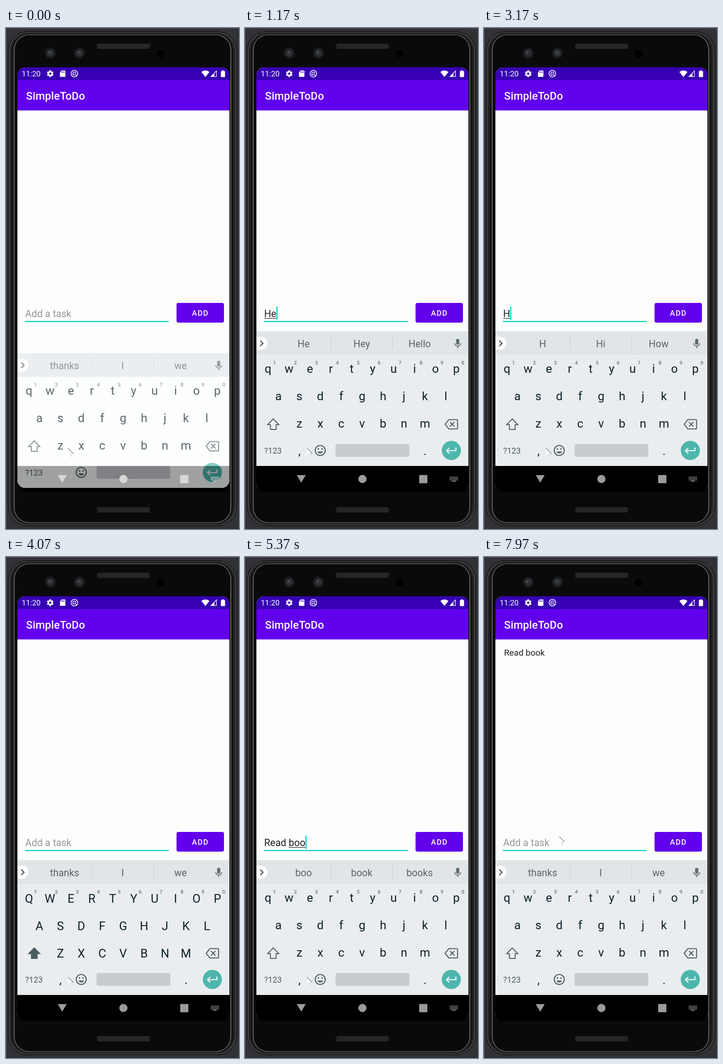
Write an HTML page with a canvas that moves like this. It is 511x1097 px and loops after 8000 ms.

```html
<!DOCTYPE html>
<html lang="en">
<head>
<meta charset="utf-8">
<title>To-do app on a phone</title>
<style>
  html, body { margin: 0; width: 100%; height: 100%; overflow: hidden; background: #303236; }
  canvas { display: block; }
</style>
</head>
<body>
<canvas id="stage" width="511" height="1097"></canvas>
<script>
const ctx = document.getElementById('stage').getContext('2d');
const LOOP = 8000;
const FONT = 'Roboto, sans-serif';
const TEAL = '#03dac5', PURPLE = '#6200ee', PAPER = '#fcfdfd';
const IDLE = 'thanks I we';

// time, typed text, suggestions, caret visible, capital keys
const TYPING = [
  [0, '', IDLE, 0], [290, '', IDLE, 1],
  [720, 'H', IDLE, 1], [870, 'H', 'H Hi How', 1],
  [1170, 'He', 'He Hey Hello', 1], [1290, 'Hel', 'He Hey Hello', 1],
  [1430, 'Hel', 'Hel Help Hello', 1], [1570, 'Hell', "Hell He'll Hello", 1],
  [2000, 'Hello', "Hello Hellos Hello's", 1], [2430, 'Hello', "Hello Hellos Hello's", 0],
  [2580, 'Hell', "Hell He'll Hello", 1], [2730, 'Hel', 'Hel Help Hello', 1],
  [3020, 'He', 'He Hey Hello', 1], [3170, 'H', 'H Hi How', 1],
  [3320, '', IDLE, 1], [3780, '', IDLE, 0], [4070, '', IDLE, 0, 1],
  [4220, 'R', 'R Re Right', 1], [4360, 'Re', 'Re Red Really', 1],
  [4500, 'Rea', 'Rea Read Really', 1], [4650, 'Read', 'Read Reading Ready', 1],
  [4790, 'Read ', 'the it about', 1], [5080, 'Read b', 'b be but', 1],
  [5220, 'Read bo', 'bo both book', 1], [5370, 'Read boo', 'boo book books', 1],
  [5650, 'Read book', 'book books booked', 1], [6110, 'Read book', 'book books booked', 0],
  [6690, 'Read book', 'book books booked', 1],
  [7390, '', IDLE, 1], [7830, '', IDLE, 0]
];
// time, tip x, tip y
const POINTER = [
  [0, 136, 920], [6250, 225, 790], [6400, 372, 584], [6540, 392, 565], [6690, 431, 506],
  [6830, 418, 612], [7540, 408, 612], [7680, 330, 622], [7830, 220, 618], [7970, 165, 612]
];
// time, radius, opacity
const RIPPLE = [[0, 0, 0], [7100, 31, .25], [7250, 88, .25], [7390, 100, .12], [7540, 0, 0]];
const ITEM_ADDED = 7390;

const at = (steps, t) => steps.findLast(s => s[0] <= t);

function box(x, y, w, h, color, r = 0) {
  ctx.fillStyle = color;
  ctx.beginPath();
  ctx.roundRect(x, y, w, h, r);
  ctx.fill();
}
function disc(x, y, r, color) {
  ctx.fillStyle = color;
  ctx.beginPath();
  ctx.arc(x, y, r, 0, 7);
  ctx.fill();
}
function text(str, x, y, size, color, { align = 'left', weight = 400, spacing = 0 } = {}) {
  ctx.font = `${weight} ${size}px ${FONT}`;
  ctx.textAlign = align;
  ctx.letterSpacing = spacing + 'px';
  ctx.fillStyle = color;
  ctx.fillText(str, x, y);
  const width = ctx.measureText(str).width;
  ctx.letterSpacing = '0px';
  return width;
}
function fillPath(d, color) {
  ctx.fillStyle = color;
  ctx.fill(new Path2D(d));
}
function line(d, color, width = 2) {
  ctx.strokeStyle = color;
  ctx.lineWidth = width;
  ctx.stroke(new Path2D(d));
}
function clipBox(x, y, w, h, r) {
  ctx.save();
  ctx.beginPath();
  ctx.roundRect(x, y, w, h, r);
  ctx.clip();
}

function speaker(y) {
  box(199, y, 117, 12, '#1d1d1d', 4);
  for (let row = 0; row < 4; row++)
    for (let x = 202 + row % 2 * 1.5; x < 314; x += 3) box(x, y + 1.5 + row * 2.6, 1.4, 1.4, '#414141');
}

function camera(x) {
  disc(x, 55, 12, '#191a1c');
  disc(x, 55, 8.5, '#27292d');
  disc(x, 55, 5, '#3a3e45');
  disc(x, 55, 2.6, '#17191c');
  disc(x - 1, 54, 1.3, '#8d939b');
}

function phone() {
  box(0, 0, 511, 1097, '#303236');
  box(0, 0, 511, 1, '#54565a');
  box(0, 0, 1, 1097, '#54565a');
  // x inset, y inset, corner radius, colour
  for (const [x, y, r, color] of [
    [4.5, 7.5, 43, '#0b0b0b'], [6, 9, 41, '#484848'], [8, 10.5, 40, '#262626'],
    [12, 12, 38, '#141414'], [17, 14, 34, '#666'], [19, 15.5, 32, '#0a0a0a']
  ]) box(x, y, 511 - 2 * x, 1098 - 2 * y, color, r);
  speaker(34);
  speaker(1049);
  camera(97);
  camera(161);
  disc(339, 56, 9, '#000');
}

function statusBar() {
  box(25, 86, 465, 28, '#3700b3');
  text('11:20', 34.5, 106, 16.6, '#fff');
  // settings gear
  disc(97, 100, 5.6, '#fff');
  for (let i = 0; i < 6; i++) {
    ctx.save();
    ctx.translate(97, 100);
    ctx.rotate(i * Math.PI / 3);
    box(-2, -7.4, 4, 3.5, '#fff', 1);
    ctx.restore();
  }
  disc(97, 100, 2.5, '#3700b3');
  // memory card
  fillPath('M122 93h7q1.3 0 1.3 1.3v11.4q0 1.3-1.3 1.3h-9.4q-1.3 0-1.3-1.3v-8.8z', '#fff');
  for (const x of [121.5, 124.2, 126.9]) box(x, 95, 1.4, 3, '#3700b3');
  // ring with a slash
  line('M157.2 100a7.2 7.2 0 1 1-14.4 0a7.2 7.2 0 1 1 14.4 0M153.5 100a3.5 3.5 0 1 0-3.5 3.5M150 100l5.2 5.2', '#fff', 1.6);
  // wifi, signal, battery
  fillPath('M437.3 107.3L428.4 96.2Q437.3 89.6 446.2 96.2z', '#fff');
  line('M461.5 94v12.3h-12z', '#fff', 1.3);
  fillPath('M449 106.8l8-8v8z', '#fff');
  box(471.2, 94.3, 9.2, 13.2, '#fff', 1.2);
  box(473.8, 92.8, 4, 2, '#fff');
}

function form(typed, caret, ripple) {
  const left = 42, size = 21.5;
  if (typed) {
    const width = text(typed, left, 633, size, '#212121');
    const start = typed.lastIndexOf(' ') + 1;
    const before = ctx.measureText(typed.slice(0, start)).width;
    if (start < typed.length) box(left + before, 635.3, width - before, 1.2, '#212121');
    if (caret) box(left + width, 610, 2.6, 29, TEAL);
  } else {
    text('Add a task', left, 633, size, '#979797');
    if (caret) box(41.3, 610, 2.6, 29, TEAL);
  }
  box(41.5, 641.6, 315.5, 2.4, '#14d3c0');

  box(374, 603, 104, 43, 'rgba(0,0,0,.1)', 5);
  box(374, 602, 104, 43, PURPLE, 4);
  text('ADD', 407.7, 630.3, 16.6, '#fff', { weight: 500, spacing: 1.48 });
  if (ripple[1]) {
    clipBox(374, 602, 104, 43, 4);
    disc(418, 612, ripple[1], `rgba(255,255,255,${ripple[2]})`);
    ctx.restore();
  }
}

function suggestionStrip(words) {
  box(25, 664, 465, 52, '#e1e5e8');
  box(11, 676, 38, 28.5, '#fff', 14);
  line('M33.5 684.5l6 6-6 6', '#37474f', 2.2);
  [128.5, 256, 383].forEach((x, i) => text(words[i], x, 698.5, 21.3, '#56646b', { align: 'center' }));
  box(189, 676, 1, 28, '#c3c9cc');
  box(323.5, 676, 1, 28, '#c3c9cc');
  box(463, 680.5, 7, 13, '#5f6d74', 3.5);
  line('M460 690a6.6 6.6 0 0 0 13.2 0M466.6 697v4', '#5f6d74', 1.9);
}

function keyRow(letters, x, y, caps) {
  [...letters].forEach((ch, i) =>
    text(caps ? ch.toUpperCase() : ch, x + i * 45.9, y + (caps ? 2 : 0), 26, '#0c1f28', { align: 'center' }));
}

function keyboard(words, caps, opening) {
  const gray = '#4d5b62';
  box(25, 715, 465, 244, opening ? PAPER : '#e9edf0');
  suggestionStrip(words);
  keyRow('qwertyuiop', 50.5, 755.3, caps);
  [...'1234567890'].forEach((n, i) =>
    text(n, 64.7 + i * 45.9, 737, 11.5, '#6a757b', { align: 'center', weight: 500 }));
  keyRow('asdfghjkl', 73.3, 814.8, caps);
  keyRow('zxcvbnm', 119.2, 874.5, caps);

  const shift = 'M62 856l12.3 12.5h-6v10.5h-12.6v-10.5h-6z';
  if (caps) fillPath(shift, gray);
  line(shift, gray, 2);
  line('M447 857.5h17.5q1.7 0 1.7 1.7v17.1q0 1.7-1.7 1.7h-17.5l-8-10.2zM449.5 862.8l10 10M459.5 862.8l-10 10', gray, 2.1);

  text('?123', 42, 931.5, 17.8, gray);
  if (!opening) {
    text(',', 119.5, 935, 26, '#0c1f28', { align: 'center' });
    text('.', 395, 935, 26, '#0c1f28', { align: 'center' });
  }
  line('M176 925a11 11 0 1 1-22 0a11 11 0 1 1 22 0', gray, 2.2);
  disc(161, 921.8, 1.7, gray);
  disc(169, 921.8, 1.7, gray);
  fillPath('M158.8 927.5h12.4a6.6 6.2 0 0 1-12.4 0z', gray);
  box(198.5, 911, 162, 28, '#c8ccd0', 4);
  disc(452.5, 925, 21, '#4db6ac');
  line('M462.5 918.5v7h-19M448 919.5l-6 6 6 6', '#fff', 2.2);
}

function navBar(color) {
  fillPath('M113.5 979h19.6l-9.8 16.5z', color);
  disc(257.5, 987.5, 9, color);
  box(382, 978.8, 18, 18, color, 1.5);
  for (let row = 0; row < 3; row++)
    for (let col = 0; col < 6; col++) box(449.3 + col * 3.1, 982.5 + row * 3, 1.9, 1.9, color);
  box(453.5, 991.5, 9, 1.8, color);
}

function pointer([, x, y]) {
  ctx.save();
  ctx.translate(x, y);
  fillPath('M0 0v16l3.8-3.4 2.6 6 2.6-1.2-2.6-5.6h5z', '#fff');
  line('M0 0l11.6 11.6', '#111', .9);
  ctx.setLineDash([1, 2]);
  line('M3.8 12.6l2.6 5.6 2.4-1.2-2.6-5.2h5', '#666', 1);
  ctx.restore();
}

function draw(t) {
  const [, typed, suggestions, caret, caps] = at(TYPING, t);
  const words = suggestions.split(' ');
  const opening = t < 140;

  phone();
  clipBox(25, 86, 465, 930, 17);
  box(25, 86, 465, 930, '#000');
  box(25, 86, 465, 921, PAPER, opening ? 17 : 0);
  statusBar();
  box(25, 114, 465, 66.6, PURPLE);
  text('SimpleToDo', 43.9, 157, 23.7, '#fff', { weight: 500, spacing: .2 });
  if (t >= ITEM_ADDED) text('Read book', 43.9, 216, 18.94, '#212121');
  form(typed, caret, at(RIPPLE, t));

  if (opening) {
    // the keyboard slides up, still pale, behind a translucent navigation bar
    clipBox(25, 600, 465, 407, [0, 0, 17, 17]);
    ctx.translate(0, 48);
    keyboard(words, caps, true);
    ctx.translate(0, -48);
    box(25, 712, 465, 247, 'rgba(255,255,255,.32)');
    box(25, 959, 465, 48, 'rgba(0,0,0,.37)');
    navBar('#d6d7d7');
    ctx.restore();
  } else {
    keyboard(words, caps, false);
    box(25, 959, 465, 57, '#000');
    navBar('#9b9b9b');
  }
  pointer(at(POINTER, t));
  ctx.restore();
}

function tick() {
  draw(performance.now() % LOOP);
  requestAnimationFrame(tick);
}
tick();
</script>
</body>
</html>
```
